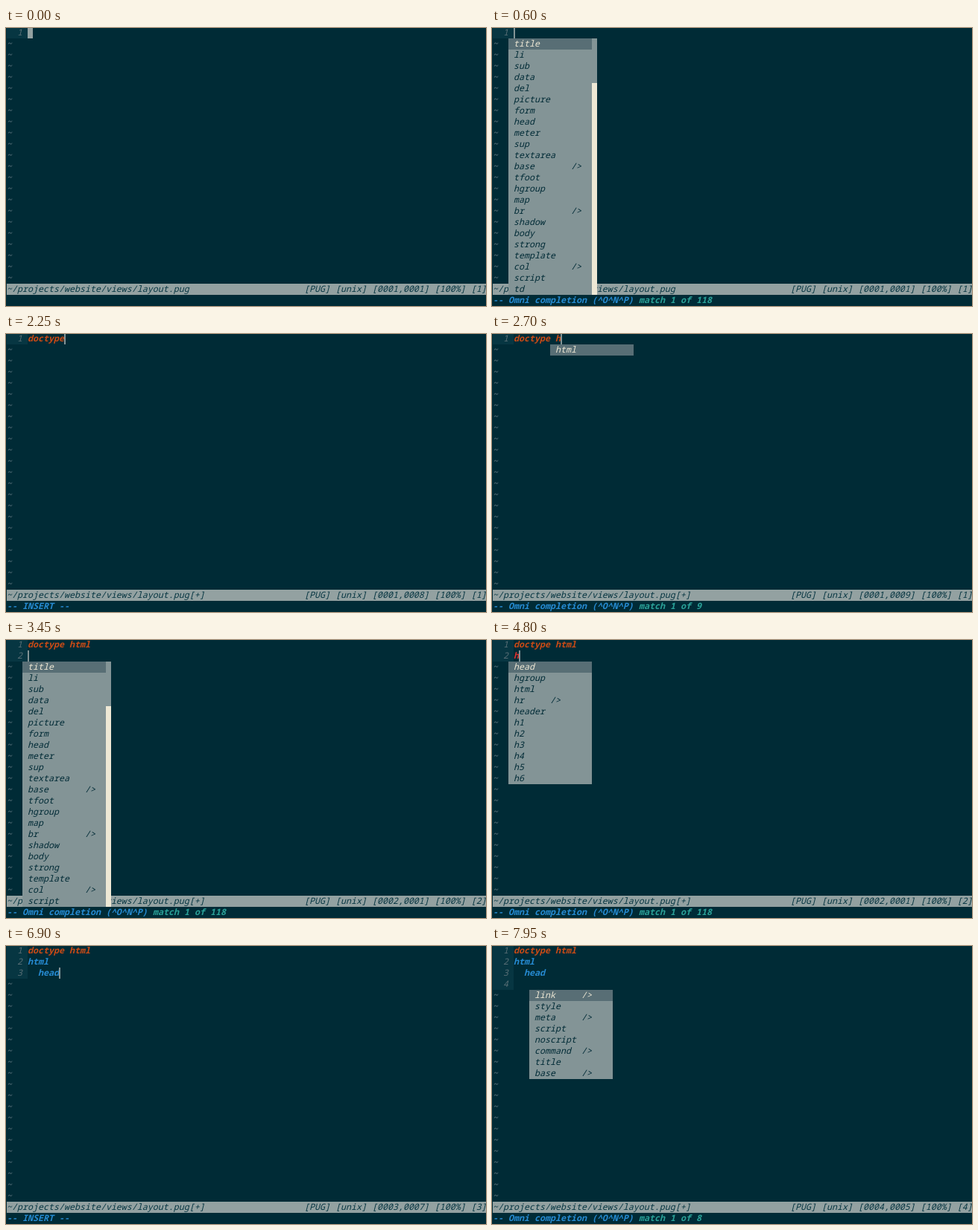
Write an HTML page with a canvas that moves like this. It is 644x374 px and loops after 8000 ms.

```html
<!DOCTYPE html>
<html lang="en">
<head>
<meta charset="utf-8">
<title>Omni completion</title>
<style>
html, body { margin: 0; width: 100%; height: 100%; overflow: hidden; background: #002b36; }
canvas { display: block; }
</style>
</head>
<body>
<canvas id="term" width="644" height="374"></canvas>
<script>
const ctx = document.getElementById('term').getContext('2d');
const LOOP = 8000, CW = 7, RH = 15;
const FACE = '11.667px "Noto Sans Mono", "DejaVu Sans Mono", monospace';
const C = {
  bg: '#002b36', gutter: '#073642', num: '#586e75', tilde: '#657b83', fg: '#839496',
  bar: '#93a1a1', light: '#eee8d5', orange: '#cb4b16', red: '#dc322f', blue: '#268bd2', cyan: '#2aa198'
};

// A trailing slash marks a self-closing tag.
const words = s => s.split(' ');
const ALL = words('title li sub data del picture form head meter sup textarea base/ tfoot hgroup map br/ ' +
  'shadow body strong template col/ script td');
const D_TAGS = words('data del dl div dfn dt dd details datalist dialog doctype');
const H_TAGS = words('head hgroup html hr/ header h1 h2 h3 h4 h5 h6');
const IN_HEAD = words('link/ style meta/ script noscript command/ title base/');

const DOC = 'doctype html';
// at: start in ms, lines: buffer, col: ruler column, menu: popup entries, from: popup column, total: match count
const states = [
  { at: 0, lines: [''], col: 1, normal: true },
  { at: 600, lines: [''], col: 1, menu: ALL, total: 118 },
  { at: 1650, lines: ['d'], col: 1, menu: D_TAGS, total: 118 },
  { at: 1800, lines: ['do'], col: 2, menu: ['doctype'], total: 118 },
  { at: 2250, lines: ['doctype'], col: 8 },
  { at: 2550, lines: ['doctype'], col: 8, menu: ['doctype'], total: 1 },
  { at: 2700, lines: ['doctype h'], col: 9, menu: ['html'], from: 8, total: 9 },
  { at: 2850, lines: [DOC], col: 12, menu: ['html'], from: 8, total: 9 },
  { at: 3150, lines: [DOC], col: 13 },
  { at: 3300, lines: [DOC, ''], col: 1 },
  { at: 3450, lines: [DOC, ''], col: 1, menu: ALL, total: 118 },
  { at: 4800, lines: [DOC, 'h'], col: 1, menu: H_TAGS, total: 118 },
  { at: 4950, lines: [DOC, 'htm'], col: 3, menu: ['html'], total: 118 },
  { at: 5850, lines: [DOC, 'html'], col: 4, menu: ['html'], total: 118 },
  { at: 6150, lines: [DOC, 'html', ''], col: 1 },
  { at: 6300, lines: [DOC, 'html', ''], col: 1, menu: ALL, total: 118 },
  { at: 6900, lines: [DOC, 'html', '  head'], col: 7 },
  { at: 7200, lines: [DOC, 'html', '  head', '    '], col: 5 },
  { at: 7350, lines: [DOC, 'html', '  head', '    '], col: 5, menu: IN_HEAD, from: 4, total: 8 }
];
const cursorOff = [[150, 300], [1200, 1500], [4200, 4350], [7950, 8000]];

const x = col => 1 + col * CW;
const y = row => row * RH - 1;

function box(col, row, cols, rows, color) {
  ctx.fillStyle = color;
  ctx.fillRect(x(col), y(row), cols * CW, rows * RH);
}

function text(str, col, row, color, weight = 400) {
  ctx.font = `italic ${weight} ${FACE}`;
  ctx.fillStyle = color;
  ctx.fillText(str, x(col), y(row) + 11);
}

function lineColor(line) {
  if (line.startsWith('doctype')) return C.orange;
  return /^\s*(html|head)$/.test(line) ? C.blue : C.red;
}

function drawMenu(items, from, top) {
  const left = from + 3;
  const rows = Math.min(items.length, 24 - top);
  const long = items === ALL;
  const wide = long ? 11 : Math.max(...items.map(w => w.replace('/', '').length)) + 1;
  box(left, top, 16, rows, C.fg);
  box(left, top, 16, 1, C.num);
  items.slice(0, rows).forEach((item, i) => {
    const label = item.endsWith('/') ? item.slice(0, -1).padEnd(wide) + '/>' : item;
    text(label, left + 1, top + i, i ? C.bg : C.light);
  });
  if (long) {
    box(left + 16, top, 1, rows, C.light);
    box(left + 16, top, 1, 4, C.fg);
  }
}

function draw(t) {
  const s = states.findLast(state => state.at <= t);
  const n = s.lines.length;
  const pad = v => String(v).padStart(4, '0');

  ctx.fillStyle = C.bg;
  ctx.fillRect(0, 0, 644, 374);

  box(0, 0, 4, n, C.gutter);
  s.lines.forEach((line, i) => {
    text(String(i + 1), 2, i, C.num);
    text(line, 4, i, lineColor(line), 600);
  });
  for (let r = n; r < 23; r++) text('~', 0, r, C.tilde);

  box(0, 23, 92, 1, C.bar);
  text('~/projects/website/views/layout.pug' + (t >= 1650 ? '[+]' : ''), 0, 23, C.gutter);
  text(`[PUG] [unix] [${pad(n)},${pad(s.col)}] [100%] [${n}]`, 57, 23, C.gutter);

  if (s.menu) {
    text('-- Omni completion (^O^N^P)', 0, 24, C.blue, 600);
    text(`match 1 of ${s.total}`, 28, 24, C.cyan, 600);
    drawMenu(s.menu, s.from || 0, n);
  } else if (!s.normal) {
    text('-- INSERT --', 0, 24, C.blue, 600);
  }

  if (!cursorOff.some(([a, b]) => t >= a && t < b)) {
    ctx.fillStyle = s.normal ? C.bar : C.fg;
    ctx.fillRect(x(4 + s.lines[n - 1].length), y(n - 1), s.normal ? CW : 2, RH);
  }
}

const start = performance.now();
function tick() {
  draw((performance.now() - start) % LOOP);
  requestAnimationFrame(tick);
}
tick();
</script>
</body>
</html>
```
